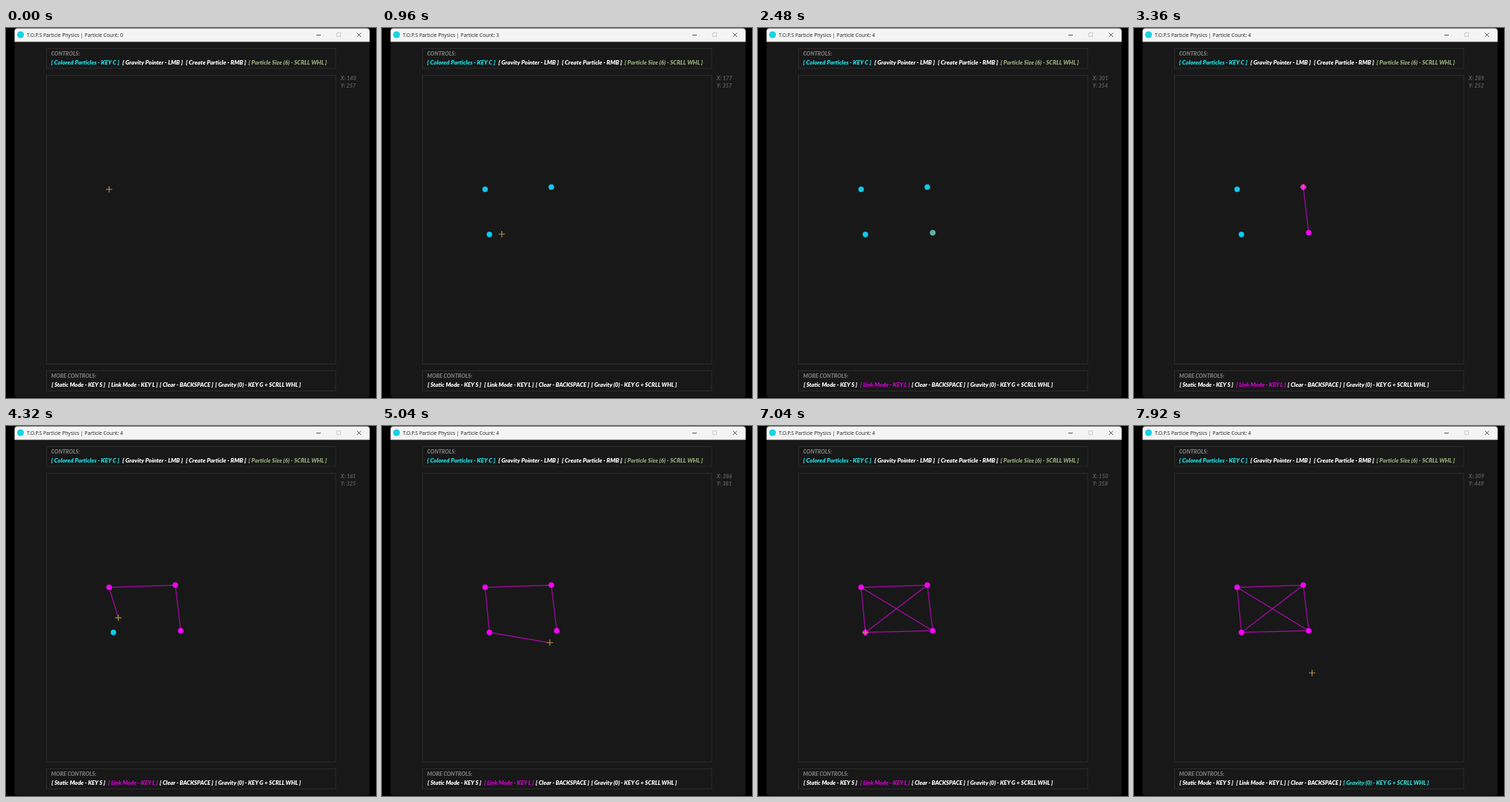
An HTML page for the animation above (8 s loop, 496 by 496 pixels).

```html
<!DOCTYPE html>
<html lang="en">
<head>
<meta charset="utf-8">
<title>Particle Physics</title>
<style>
html, body { margin: 0; width: 100%; height: 100%; overflow: hidden; background: #000; }
svg { display: block; width: 496px; height: 496px; }
text { font: italic 900 7.65px Lato, sans-serif; fill: #fff; white-space: pre; }
#title { font: 400 6.75px "Open Sans", sans-serif; fill: #222; }
.top { font-size: 7.9px; }
.head { fill: #777; font-size: 7.3px; }
.coord { fill: #525252; font-size: 7.3px; }
.panel { fill: none; stroke: #2b2b2b; }
.button { fill: none; stroke: #333; stroke-width: .8; }
#links { stroke: #a808a8; stroke-width: 1.2; fill: none; }
#cursor { stroke: #b8924a; stroke-width: 1.1; }
</style>
</head>
<body>
<svg viewBox="0 0 496 496">
  <clipPath id="frame"><rect x="11.5" y=".5" width="476" height="495" rx="4"/></clipPath>
  <g clip-path="url(#frame)">
    <rect width="496" height="496" fill="#181818"/>
    <rect width="496" height="18.5" fill="#f4f4f4"/>
  </g>
  <circle cx="19.5" cy="9" r="4.6" fill="#18d2e4"/>
  <text id="title" x="28" y="11.8"></text>
  <path class="button" d="M416 9.5h6M470.5 6.5l5.5 5.5m0-5.5l-5.5 5.5"/>
  <path class="button" d="M443.5 6.5h5v5h-5z" style="stroke:#c4c4c4"/>
  <rect class="panel" x="54.5" y="27.5" width="387.5" height="26.5"/>
  <rect class="panel" x="54.5" y="63.5" width="387.5" height="387"/>
  <rect class="panel" x="54.5" y="459.5" width="387.5" height="27"/>
  <text class="head" x="60.5" y="36.8">CONTROLS:</text>
  <text class="top" x="60.5" y="48.7" style="fill:#22e2e8">[ Colored Particles - KEY C ]</text>
  <text class="top" x="156" y="48.7">[ Gravity Pointer - LMB ]</text>
  <text class="top" x="241" y="48.7">[ Create Particle - RMB ]</text>
  <text class="top" x="325" y="48.7" style="fill:#96aa7c">[ Particle Size (6) - SCRLL WHL ]</text>
  <text class="head" x="60.5" y="469.3">MORE CONTROLS:</text>
  <text x="61" y="481">[ Static Mode - KEY S ]</text>
  <text id="linkMode" x="137" y="481">[ Link Mode - KEY L ]</text>
  <text x="206" y="481">[ Clear - BACKSPACE ]</text>
  <text id="gravity" x="280.5" y="481">[ Gravity (0) - KEY G + SCRLL WHL ]</text>
  <text class="coord" id="posX" x="448.5" y="70.3"></text>
  <text class="coord" id="posY" x="448.5" y="79.6"></text>
  <path id="links"/>
  <g id="dots"></g>
  <path id="cursor" d="M-4.2 0h8.4M0-4.2v8.4"/>
</svg>
<script>
const LOOP = 8000, STEP = 80;
const LINK_ON = 2080, LINK_OFF = 7280, GRAVITY_ON = 7680, EXIT = 7920;
const dots = [[138.2, 216.3], [227, 213.3], [144, 276.7], [234.2, 274.4]];

// Dots are placed, then linked, at a steady pace
const born = dots.map((_, i) => 130 + 365 * i);
const clicks = [3, 1, 0, 2, 3, 0, 1, 2].map((dot, i) => ({ t: 2760 + 600 * i, dot }));
const stops = [
  { t: 0, p: dots[0] },
  ...dots.map((p, i) => ({ t: born[i], p })),
  ...clicks.map(({ t, dot }) => ({ t, p: dots[dot] })),
  { t: LINK_OFF, p: dots[2] },
  { t: EXIT, p: [238.8, 331] },
  { t: LOOP, p: [238.8, 331] }
];

const el = id => document.getElementById(id);
const circles = dots.map(([x, y]) => {
  const c = document.createElementNS("http://www.w3.org/2000/svg", "circle");
  c.setAttribute("cx", x);
  c.setAttribute("cy", y);
  c.setAttribute("r", 3.7);
  return el("dots").appendChild(c);
});

// Eased travel between stops; linking strokes bow outwards
function pointer(t) {
  const i = stops.findIndex(s => s.t > t);
  const a = stops[i - 1], b = stops[i];
  const u = (t - a.t) / (b.t - a.t), e = u * u * (3 - 2 * u);
  const dx = b.p[0] - a.p[0], dy = b.p[1] - a.p[1];
  const bow = t > LINK_ON && t < LINK_OFF ? .3 * Math.sin(Math.PI * u) : 0;
  return [
    a.p[0] + dx * e + Math.abs(dy) * bow / 2,
    a.p[1] + dy * e + Math.abs(dx) * bow
  ];
}

function draw(t) {
  const [x, y] = pointer(t);
  const linking = t >= LINK_ON && t < LINK_OFF;
  const chain = clicks.filter(c => c.t <= t).map(c => c.dot);
  const points = chain.map(i => dots[i]);
  if (points.length && linking) points.push([x, y]);

  el("title").textContent = "T.O.P.S Particle Physics | Particle Count: " + born.filter(b => b <= t).length;
  el("posX").textContent = "X: " + Math.round((x - 55) * 1.68);
  el("posY").textContent = "Y: " + Math.round((y - 63) * 1.675);
  el("linkMode").style.fill = linking ? "#cc04cc" : "#fff";
  el("gravity").style.fill = t >= GRAVITY_ON ? "#35dcd0" : "#fff";
  el("links").setAttribute("d", points.length ? "M" + points.join("L") : "");
  el("cursor").setAttribute("transform", `translate(${x} ${y})`);
  el("cursor").style.opacity = linking && !chain.length ? .4 : 1;

  circles.forEach((c, i) => {
    const hover = linking && Math.hypot(x - dots[i][0], y - dots[i][1]) < 4;
    c.style.display = t >= born[i] ? "" : "none";
    c.style.fill = chain.includes(i) ? "#f404f4" : hover ? "#45bec4" : "#0ec8ee";
  });
}

const start = performance.now();
function tick() {
  const t = (performance.now() - start) % LOOP;
  draw(Math.floor(t / STEP) * STEP);
  requestAnimationFrame(tick);
}
tick();
</script>
</body>
</html>
```
